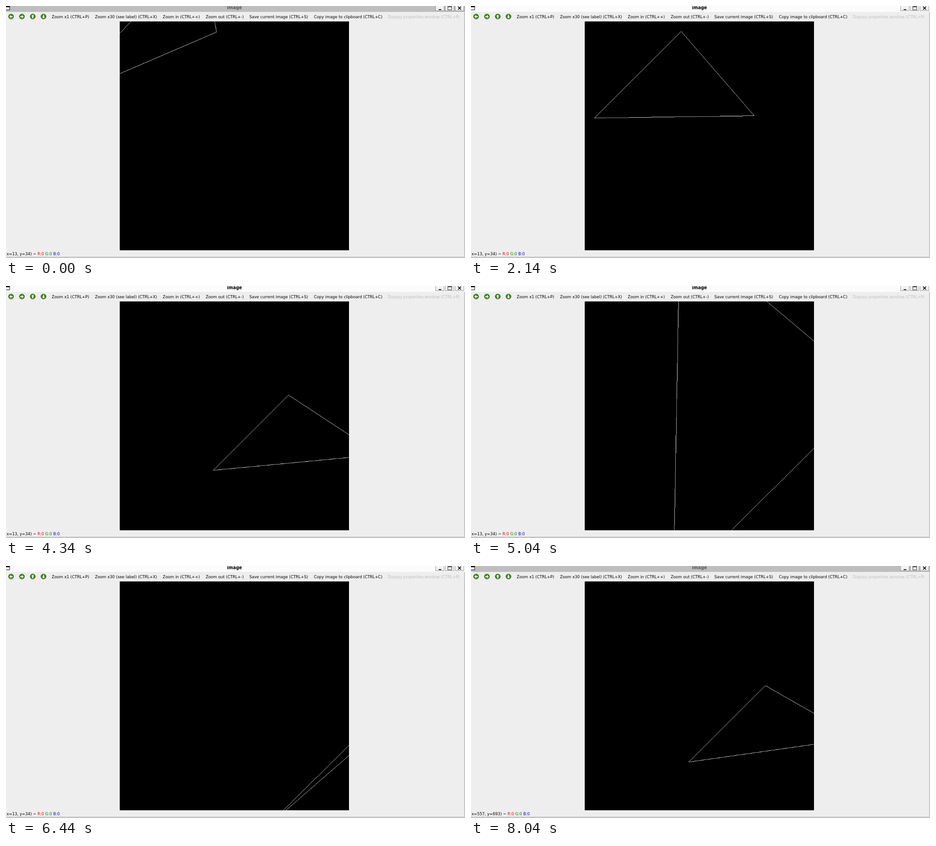
An HTML page with a canvas that plays this animation: 1009 by 555 pixels, repeating every 8140 ms.

```html
<!DOCTYPE html>
<html lang="en">
<head>
<meta charset="utf-8">
<title>image</title>
<style>
  html, body { margin: 0; width: 100%; height: 100%; overflow: hidden; background: #eee; }
  canvas { display: block; }
</style>
</head>
<body>
<canvas id="stage" width="1009" height="555"></canvas>
<script>
const LOOP = 8140, SIZE = 700;
const ctx = document.getElementById('stage').getContext('2d');
const raster = document.createElement('canvas');
raster.width = raster.height = SIZE;
const pixels = raster.getContext('2d');
const FONT = '8.64px "DejaVu Sans", sans-serif';
const TITLE_FONT = 'bold 9.6px "DejaVu Sans", sans-serif';

const MENU = [
  [100.6, 'Zoom x1 (CTRL+P)'], [195.4, 'Zoom x30 (see label) (CTRL+X)'],
  [344.6, 'Zoom in (CTRL++)'], [438.9, 'Zoom out (CTRL+-)'],
  [535, 'Save current image (CTRL+S)'], [676.9, 'Copy image to clipboard (CTRL+C)'],
  [839.2, 'Display properties window (CTRL+P)']
];
const TRIANGLE = [[2, 0, -2], [0, 2, -2], [-2, 0, -2]];

function rect(x, y, w, h, color) {
  ctx.fillStyle = color;
  ctx.fillRect(x, y, w, h);
}

function text(str, x, y, color = '#000') {
  ctx.fillStyle = color;
  ctx.fillText(str, x, y);
  return x + ctx.measureText(str).width;
}

// Single taps first, then a held key repeating every 50.6 ms, sampled every 100 ms.
function angleAt(t) {
  if (t < 840) return 90;
  if (t < 1240) return 80;
  if (t < 1340) return 70;
  if (t < 1440) return 50;
  if (t < 1640) return 40;
  if (t < 2140) return 30;
  const held = Math.floor((t - 2140) / 100) * 100;
  return 20 - 10 * Math.floor((held + 18) / 50.6);
}

// Rotates about the (1, 1, 0) axis and projects with a 45 degree camera at z = 5.
function project([x, y, z], degrees) {
  const a = degrees * Math.PI / 180, c = Math.cos(a), s = Math.sin(a);
  const u = (x + y) / Math.SQRT2, v = (y - x) / Math.SQRT2;
  const v2 = v * c - z * s, z2 = v * s + z * c;
  const scale = SIZE / 2 / Math.tan(Math.PI / 8) / (5 - z2);
  return [
    Math.trunc(SIZE / 2 + scale * (u - v2) / Math.SQRT2),
    SIZE - Math.trunc(SIZE / 2 + scale * (u + v2) / Math.SQRT2)
  ];
}

function pixelLine([x0, y0], [x1, y1]) {
  const n = Math.max(Math.abs(x1 - x0), Math.abs(y1 - y0), 1);
  for (let i = 0; i <= n; i++) {
    pixels.fillRect(Math.round(x0 + (x1 - x0) * i / n), Math.round(y0 + (y1 - y0) * i / n), 1, 1);
  }
}

function drawTriangle(degrees) {
  pixels.fillStyle = '#000';
  pixels.fillRect(0, 0, SIZE, SIZE);
  pixels.fillStyle = '#fff';
  const points = TRIANGLE.map(p => project(p, degrees));
  points.forEach((p, i) => pixelLine(p, points[(i + 1) % 3]));
  ctx.imageSmoothingEnabled = true;
  ctx.imageSmoothingQuality = 'low';
  ctx.drawImage(raster, 250, 34, 504, 504);
}

function arrowIcon(x, turn) {
  ctx.save();
  ctx.translate(x, 23.2);
  const shade = ctx.createLinearGradient(0, -6, 0, 6);
  shade.addColorStop(0, '#4f8f2c');
  shade.addColorStop(0.5, '#2f7410');
  shade.addColorStop(1, '#5fa832');
  ctx.fillStyle = shade;
  ctx.beginPath();
  ctx.arc(0, 0, 5.8, 0, 7);
  ctx.fill();
  ctx.strokeStyle = '#2c6212';
  ctx.lineWidth = 0.6;
  ctx.stroke();
  ctx.rotate(turn * Math.PI / 2);
  ctx.fillStyle = '#fff';
  ctx.fill(new Path2D('M3.9 0L.3-3.5V-1.2H-3.5V1.2H.3V3.5Z'));
  ctx.restore();
}

function drawTitleBar(active) {
  rect(0, 0, 1009, 13, active ? '#fcfcfc' : '#bebebe');
  ctx.font = TITLE_FONT;
  ctx.textAlign = 'center';
  text('image', 502.2, 7.2, active ? '#000' : '#5c5c5c');
  ctx.textAlign = 'left';

  rect(0, 0, 8.5, 9, '#000');
  rect(0, 2.6, 7.5, 5.4, '#fff');

  for (const x of [944, 965.6, 987.2]) {
    rect(x, 0, 19.4, 11, '#777');
    rect(x + 0.7, 0, 18, 10.2, '#f3f3f3');
  }
  rect(951, 7, 6, 1.8, '#000');
  rect(970.8, 0.7, 9.4, 8.2, '#000');
  rect(971.6, 2.3, 7.8, 5.8, '#f3f3f3');
  ctx.strokeStyle = '#000';
  ctx.lineWidth = 1.7;
  ctx.stroke(new Path2D('M993.7 1.4L1000.3 8M1000.3 1.4L993.7 8'));
}

function drawStatus(position) {
  let x = text(`(${position}) ~ `, -2.2, 548.8);
  x = text('R:0 ', x, 548.8, '#f00');
  x = text('G:0 ', x, 548.8, '#008000');
  text('B:0', x, 548.8, '#00f');
}

function draw(t) {
  rect(0, 0, 1009, 555, '#eee');
  rect(1007, 13, 2, 542, '#c6c6c6');
  rect(0, 552, 1009, 3, '#c6c6c6');
  drawTitleBar(t >= 640 && t < 8040);

  [[11.2, 2], [35, 0], [58.8, 3], [82.4, 1]].forEach(([x, turn]) => arrowIcon(x, turn));
  ctx.font = FONT;
  MENU.forEach(([x, label], i) => text(label, x, 27, i === 6 ? '#bebebe' : '#000'));

  drawStatus(t < 7040 ? 'x=13, y=34' : t < 7140 ? 'x=603, y=643' : 'x=557, y=693');
  drawTriangle(angleAt(t));
}

const start = performance.now();
function tick() {
  draw((performance.now() - start) % LOOP);
  requestAnimationFrame(tick);
}
tick();
</script>
</body>
</html>
```
